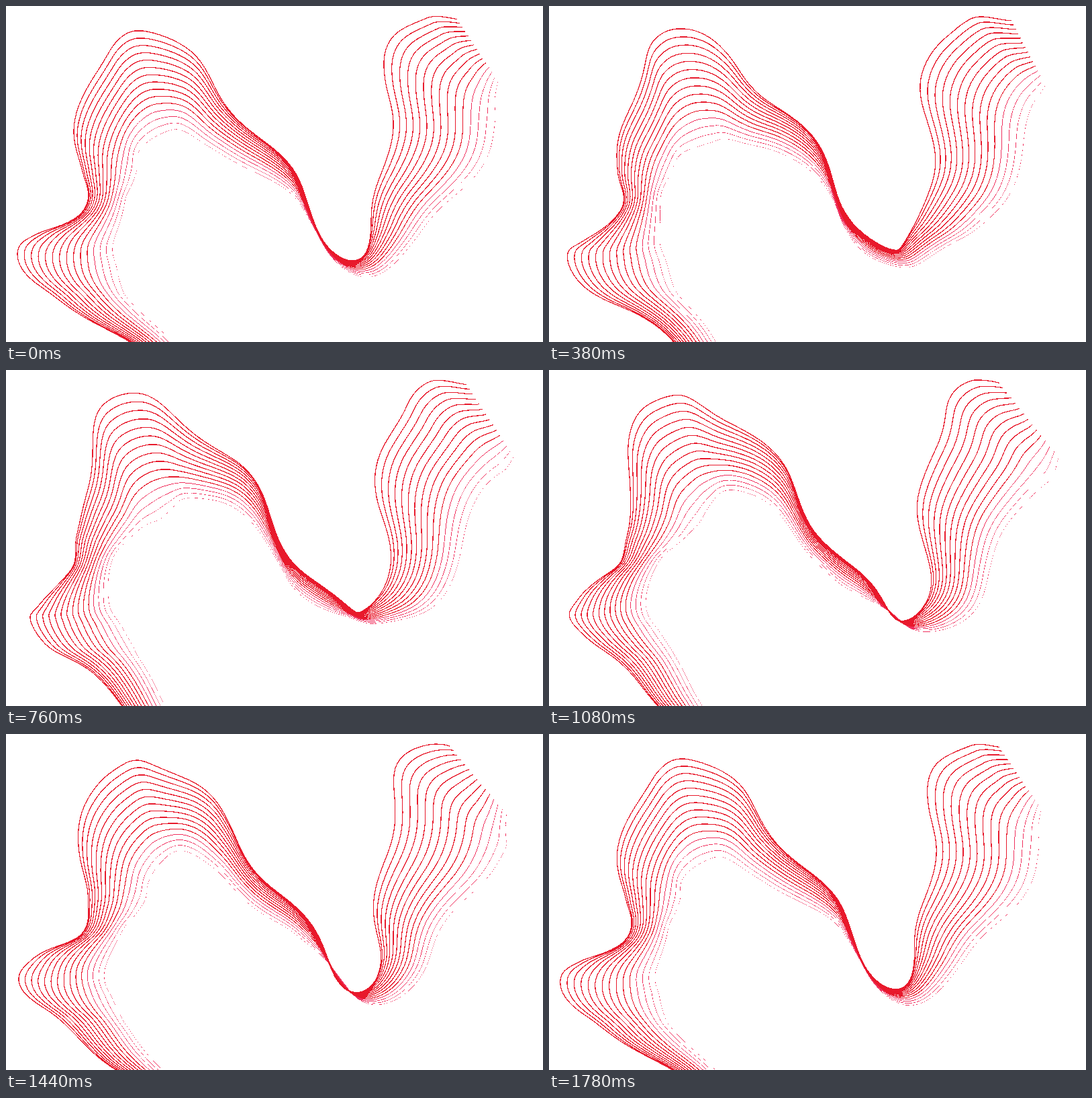
An HTML page with a canvas that plays this animation: 800 px wide and 500 px high, repeating every 1800 ms.

```html
<!DOCTYPE html>
<html lang="en">
<head>
<meta charset="utf-8">
<title>Ribbon of lines</title>
<style>
html, body { margin: 0; width: 100%; height: 100%; overflow: hidden; background: #fff; }
canvas { display: block; }
</style>
</head>
<body>
<canvas id="stage" width="800" height="500"></canvas>
<script>
const LOOP = 1800, STEP = 20, LINES = 15, SPAN = 12, DETAIL = 8;
const W = 800, H = 500, RAD = Math.PI / 180;
const ctx = document.getElementById('stage').getContext('2d', { willReadFrequently: true });

// Key points of the ribbon at rest: outer x, y, then the facing inner x, y.
const ribbon = [
  [676, 20, 736, 106], [630, 17, 724, 124], [588, 48, 713, 142],
  [568, 110, 700, 170], [563, 180, 680, 220], [561, 260, 645, 290],
  [554, 330, 607, 350], [530, 369, 545, 386], [500, 361, 498, 368],
  [451, 300, 448, 320], [411, 241, 410, 272], [364, 175, 345, 210],
  [327, 131, 300, 183], [270, 74, 262, 169], [203, 37, 232, 176],
  [155, 53, 211, 190], [129, 100, 195, 208], [112, 180, 183, 235],
  [112, 245, 172, 258], [108, 297, 156, 290], [48, 341, 138, 350],
  [26, 368, 147, 385], [50, 406, 161, 415], [125, 459, 183, 445],
  [215, 535, 255, 535]
];

const mix = (a, b, u) => a + (b - a) * u;

function catmull(a, b, c, d, t) {
  return b + t / 2 * (c - a + t * (2 * a - 5 * b + 4 * c - d + t * (3 * (b - c) + d - a)));
}

function smooth(keys) {
  const last = keys.length - 1, pts = [];
  const key = i => keys[Math.min(Math.max(i, 0), last)];
  for (let i = 0; i <= last * DETAIL; i++) {
    const k = Math.floor(i / DETAIL), t = i / DETAIL - k;
    const [a, b, c, d] = [key(k - 1), key(k), key(k + 1), key(k + 2)];
    pts.push({ x: catmull(a[0], b[0], c[0], d[0], t), y: catmull(a[1], b[1], c[1], d[1], t) });
  }
  return pts;
}

// A wave runs along the edge and turns back near the tail.
// Crests flatten at the top of the stage; slip lets the free end slide lengthwise.
function makeEdge(col, { wave, phase, slip }) {
  const pts = smooth(ribbon.map(r => r.slice(col, col + 2)));
  let s = 0;
  pts.forEach((p, i) => {
    const a = pts[Math.max(i - 1, 0)], b = pts[Math.min(i + 1, pts.length - 1)];
    const len = Math.hypot(b.x - a.x, b.y - a.y);
    if (i) s += Math.hypot(p.x - a.x, p.y - a.y);
    p.s = s;
    p.tx = (b.x - a.x) / len;
    p.ty = (b.y - a.y) / len;
  });
  const turn = s * 0.88;
  for (const p of pts) {
    const run = turn - Math.hypot(p.s - turn, 25);
    const swing = 15 - 6 * p.s / s, free = slip * Math.exp(-p.s / 40);
    const flat = p.tx ** 2 * Math.exp(-((p.y / 70) ** 2));
    p.phase = (phase + run / wave * 360) * RAD;
    p.across = swing * (1 - flat) * (1 - free);
    p.along = swing * free;
  }
  return pts;
}
const outer = makeEdge(0, { wave: 246, phase: 195, slip: 1 });
const inner = makeEdge(2, { wave: 258, phase: 5, slip: 0 });

// Lines crowd towards the outer edge where the ribbon is narrow.
const crowd = outer.map((p, i) => {
  const width = Math.hypot(inner[i].x - p.x, inner[i].y - p.y);
  return 1 + 0.8 * Math.exp(-((width / 60) ** 2));
});

const pose = (edge, angle) => edge.map(p => {
  const n = p.across * Math.cos(angle - p.phase), t = p.along * Math.sin(angle - p.phase);
  return [p.x - p.ty * n + p.tx * t, p.y + p.tx * n + p.ty * t];
});

// Hard-edged pixels: thin lines break up into dashes.
function harden() {
  const img = ctx.getImageData(0, 0, W, H), px = img.data;
  for (let i = 3; i < px.length; i += 4) px[i] = px[i] > 127 ? 255 : 0;
  ctx.putImageData(img, 0, 0);
}

function draw(ms) {
  const angle = ms / LOOP * Math.PI * 2;
  const from = pose(outer, angle), to = pose(inner, angle);
  ctx.clearRect(0, 0, W, H);
  ctx.lineJoin = 'round';
  for (let k = LINES - 1; k >= 0; k--) {
    ctx.strokeStyle = k > 10 ? '#f0325f' : '#e81a2c';
    ctx.lineWidth = 1.25 - 0.13 * Math.max(0, k - 9);
    ctx.beginPath();
    from.forEach(([x, y], i) => {
      const u = (k / SPAN) ** crowd[i];
      ctx.lineTo(mix(x, to[i][0], u), mix(y, to[i][1], u));
    });
    ctx.stroke();
  }
  harden();
}

const start = performance.now();
function tick() {
  const ms = (performance.now() - start) % LOOP;
  draw(Math.floor(ms / STEP) * STEP);
  requestAnimationFrame(tick);
}
tick();
</script>
</body>
</html>
```
